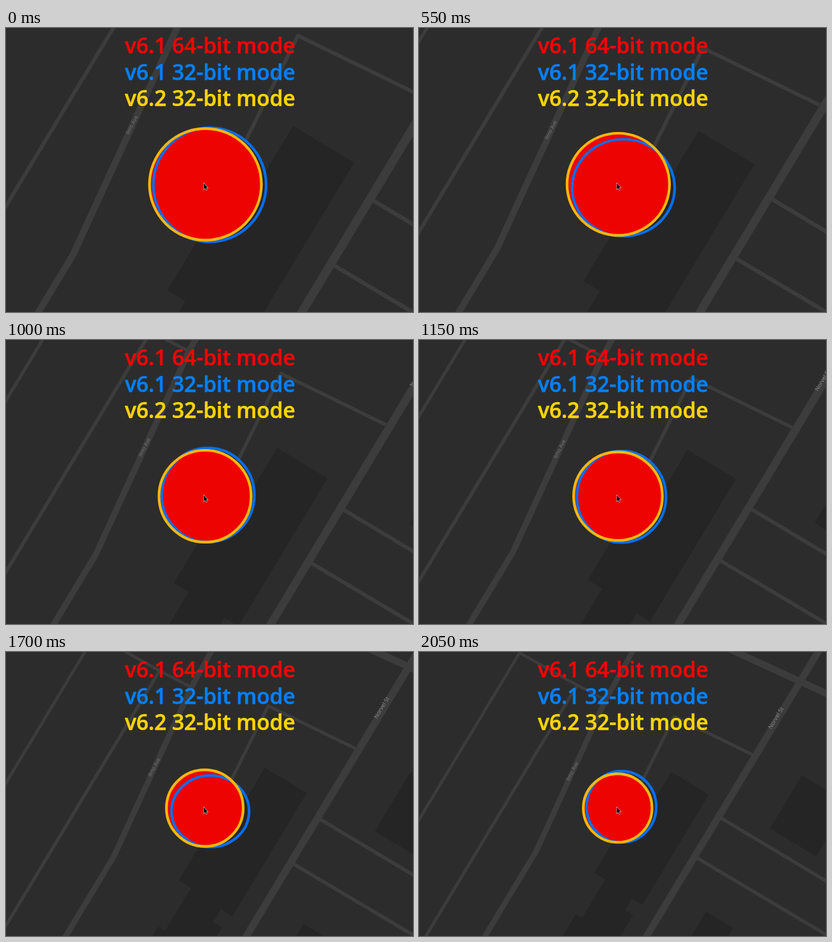
Recreate the animation shown at these times as an HTML page with a canvas. Size 640 by 448 pixels, loop 2.1 s.

```html
<!DOCTYPE html>
<html lang="en">
<head>
<meta charset="utf-8">
<title>Precision modes</title>
<style>
html, body { margin: 0; width: 100%; height: 100%; overflow: hidden; background: #2c2c2c; }
canvas { display: block; }
</style>
</head>
<body>
<canvas id="stage" width="640" height="448"></canvas>
<script>
const ctx = document.getElementById('stage').getContext('2d');
const LOOP = 2100, STEP = 50;
const CX = 310, CY = 244.5;   // zoom anchor
const TILT = 31 * Math.PI / 180; // the street grid is rotated by this

// time in ms, zoom scale
const ZOOM = [[0, 1], [300, .968], [800, .866], [1150, .793], [1400, .772], [1700, .686], [2050, .614]];

// everything on the map uses grid coordinates: x across the streets, y along them
function drawStreets(s) {
  road(s, 5.5, -416, 600, -416, -212, -247, -217, -165, -222);
  road(s, 6, -247, -217, -247, 600);
  road(s, 6, 230, -295, 8, -276, 24, -78);
  road(s, 6.5, 238, -114, 700, -114);
  road(s, 6.5, 238, 5.5, 700, 4);
  road(s, 10.5, -171, -401, -165, -222, -117, 203, -117, 524);
  road(s, 13, 28, -496, 346, -531);
  road(s, 13.5, 238, -646, 238, 400);
}

function drawBuildings() {
  ctx.fillStyle = '#252525';
  ctx.beginPath();
  ctx.rect(75, -150, 112, 331);
  ctx.rect(39, 6, 40, 168);
  ctx.rect(72, 170, 84, 130);
  ctx.rect(72, 215, 108, 85);
  ctx.rect(53, 289, 127, 80);
  ctx.rect(366, -315, 139, 160);
  ctx.rect(336, 112, 81, 100);
  ctx.fill();
}

function trace(pts) {
  ctx.beginPath();
  for (let i = 0; i < pts.length; i += 2) ctx.lineTo(pts[i], pts[i + 1]);
}

function road(s, width, ...pts) {
  trace(pts);
  ctx.lineWidth = width * Math.pow(s, .4) / s;
  ctx.stroke();
}

function label(text, x, y, s, angle, size, color) {
  ctx.save();
  ctx.translate(CX + x * s, CY + y * s);
  ctx.rotate(angle * Math.PI / 180);
  ctx.font = size + 'px "Open Sans", sans-serif';
  ctx.textAlign = 'center';
  ctx.textBaseline = 'middle';
  ctx.fillStyle = color;
  ctx.fillText(text, 0, 0);
  ctx.restore();
}

function drawMap(s) {
  ctx.fillStyle = '#2c2c2c';
  ctx.fillRect(0, 0, 640, 448);
  ctx.save();
  ctx.translate(CX, CY);
  ctx.rotate(TILT);
  ctx.scale(s, s);
  ctx.strokeStyle = '#3c3c3c';
  ctx.lineJoin = 'round';
  drawBuildings();
  drawStreets(s);
  ctx.restore();
  label('Ilmo Ave', -111.5, -91, s, -63, 8, '#7c7c7c');
  label('Norvel St', 410, -228, s, -59, 9, '#8c8c8c');
}

function zoomAt(t) {
  const i = Math.max(1, ZOOM.findIndex(k => k[0] >= t));
  const [a, from] = ZOOM[i - 1], [b, to] = ZOOM[i];
  return from * Math.pow(to / from, (t - a) / (b - a));
}

function noise(n) {
  const v = Math.sin(n * 127.1 + 11.7) * 43758.5453;
  return (v - Math.floor(v)) * 2 - 1;
}

function ring(x, y, rx, ry, color) {
  ctx.beginPath();
  ctx.ellipse(x, y, rx, ry, 0, 0, Math.PI * 2);
  ctx.lineWidth = 4.2;
  ctx.strokeStyle = color;
  ctx.stroke();
}

function drawCircles(s, step) {
  const x = CX + .5 + 3.1 * s, y = CY + .8 + 1.4 * s, r = 88 * s;
  // rounding errors push each edge of the blue ring on its own
  const wave = Math.cos((step - 8) / 23 * Math.PI * 2);
  const left = 6.5 + 1.5 * wave + noise(step);
  const right = left + 1 + noise(step + 50);
  const top = 4 + 8 * wave + noise(step + 100);
  const bottom = 1.5 + 2 * noise(step + 150);
  ctx.beginPath();
  ctx.arc(x, y, r, 0, Math.PI * 2);
  ctx.fillStyle = '#ee0303';
  ctx.fill();
  ring(x + (left + right) / 2, y + (top + bottom) / 2,
    r + (right - left) / 2, r + (bottom - top) / 2, '#056eee');
  ring(x, y, r, r, '#fab70a');
}

function drawCursor() {
  ctx.save();
  ctx.translate(311.2, 245);
  ctx.scale(.82, .88);
  trace([0, 0, 0, 10.5, 2.4, 8.4, 4, 12, 5.8, 11.2, 4.2, 7.7, 7.2, 7.5]);
  ctx.closePath();
  ctx.lineWidth = 1.4;
  ctx.strokeStyle = '#ddd';
  ctx.stroke();
  ctx.fillStyle = '#000';
  ctx.fill();
  ctx.restore();
}

function heading(text, color, y) {
  ctx.font = '600 33.5px "Open Sans", "Noto Sans", sans-serif';
  ctx.textAlign = 'center';
  ctx.textBaseline = 'alphabetic';
  ctx.fillStyle = ctx.strokeStyle = color;
  ctx.lineWidth = .6;
  ctx.fillText(text, 321, y);
  ctx.strokeText(text, 321, y);
}

const start = performance.now();
function frame() {
  const step = Math.floor((performance.now() - start) % LOOP / STEP);
  const s = zoomAt(step * STEP);
  drawMap(s);
  drawCircles(s, step);
  heading('v6.1 64-bit mode', '#f00505', 40);
  heading('v6.1 32-bit mode', '#0080ff', 81.5);
  heading('v6.2 32-bit mode', '#ffd500', 123);
  drawCursor();
  requestAnimationFrame(frame);
}
frame();
</script>
</body>
</html>
```
